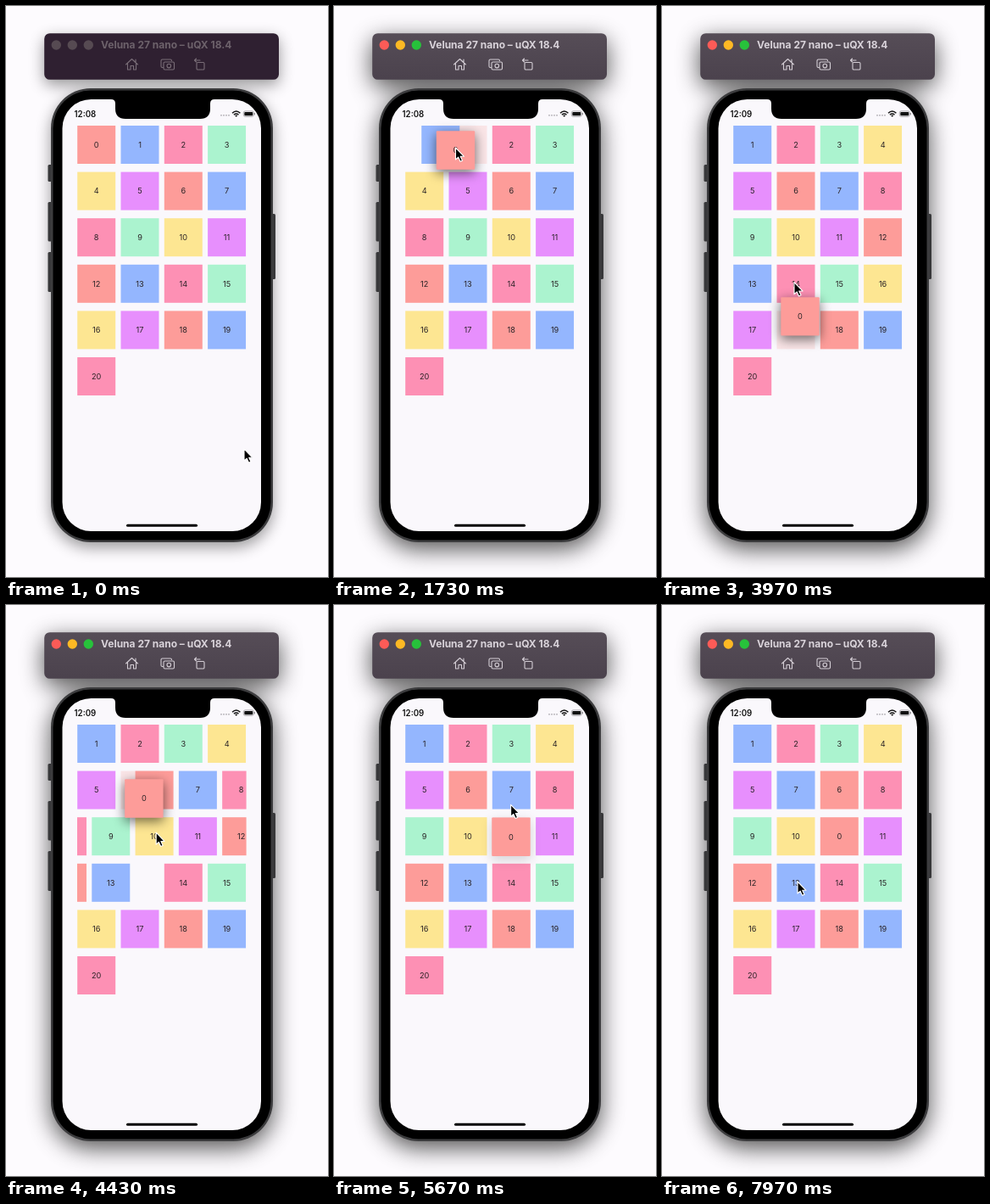
Animation of 380 by 673 pixels, one loop 8000 ms. Source, as an HTML page:

```html
<!DOCTYPE html>
<html lang="en">
<head>
<meta charset="utf-8">
<title>Grid reordering</title>
<style>
  html, body { margin: 0; width: 100%; height: 100%; overflow: hidden; background: #fdfbfe; }
  svg { display: block; width: 380px; height: 673px; }
  text { font-family: Inter, Roboto, sans-serif; }
  .label { font-size: 9.2px; fill: #2a2326; text-anchor: middle; }
  .bar { fill: #2f2031; }
  .ink { fill: #6d626b; }
  .line { fill: none; stroke: #7a6e78; stroke-width: 1.1; stroke-linejoin: round; stroke-linecap: round; }
  .light { fill: #564a52; }
  .active .bar { fill: url(#barFill); }
  .active .ink { fill: #d9d3da; }
  .active .line { stroke: #d4ced5; }
  .active .red { fill: #fc5b57; }
  .active .amber { fill: #fdb924; }
  .active .green { fill: #27c23b; }
  .deep, .active .soft { display: none; }
  .active .deep { display: inline; }
</style>
</head>
<body>
<svg id="stage" viewBox="0 0 380 673">
  <defs>
    <linearGradient id="barFill" x1="0" y1="0" x2="0" y2="1">
      <stop offset="0" stop-color="#564d57"/><stop offset="1" stop-color="#4b424d"/>
    </linearGradient>
    <filter id="blurSoft" x="-30%" y="-30%" width="160%" height="160%"><feGaussianBlur stdDeviation="9"/></filter>
    <filter id="blurDeep" x="-40%" y="-40%" width="180%" height="180%"><feGaussianBlur stdDeviation="14"/></filter>
    <filter id="blurTile" x="-80%" y="-80%" width="260%" height="260%"><feGaussianBlur stdDeviation="7"/></filter>
    <clipPath id="gridClip"><rect x="84" y="136" width="199.6" height="480"/></clipPath>
    <g id="outline">
      <rect x="45" y="32" width="277" height="55" rx="7"/>
      <rect x="53" y="97" width="262" height="535" rx="47"/>
    </g>
  </defs>

  <rect width="380" height="673" fill="#fdfbfe"/>
  <use class="soft" href="#outline" y="6" opacity=".4" filter="url(#blurSoft)"/>
  <use class="deep" href="#outline" y="8" opacity=".68" filter="url(#blurDeep)"/>

  <rect class="bar" x="45.2" y="32.2" width="276.8" height="54.6" rx="6.5"/>
  <circle class="light red" cx="59.3" cy="46" r="5.7"/>
  <circle class="light amber" cx="78.3" cy="46" r="5.7"/>
  <circle class="light green" cx="97.3" cy="46" r="5.7"/>
  <text class="ink" x="112" y="50" font-size="12" font-weight="700">Veluna 27 nano – uQX 18.4</text>
  <g class="line">
    <path d="M141.5 69L148.5 62.5L155.5 69M143.5 68V75H147V70.5H150.5V75H153.5V68M153 66V63"/>
    <path d="M185.5 72.5H184.5Q183 72.5 183 71V64.5Q183 63 184.5 63H194Q195.5 63 195.5 64.5"/>
    <rect x="186" y="66" width="12.5" height="9" rx="1.5"/>
    <circle cx="192.3" cy="70.6" r="2.3"/>
    <rect x="225" y="66.5" width="9" height="8.5" rx="1.3"/>
    <path d="M222.5 64H229M224.5 62L222.5 64L224.5 66"/>
  </g>

  <g fill="#38383a">
    <rect x="49.5" y="187" width="5" height="20" rx="1.5"/>
    <rect x="49.5" y="231" width="5" height="46.5" rx="1.5"/>
    <rect x="49.5" y="290" width="5" height="47" rx="1.5"/>
    <rect x="313" y="245" width="5" height="77" rx="1.5"/>
  </g>
  <rect x="53" y="97" width="262" height="535" rx="47" fill="#3c3c3e"/>
  <rect x="55.5" y="99.5" width="257" height="530" rx="44.5" fill="#000"/>
  <rect x="66.5" y="110" width="234.5" height="509" rx="34" fill="#faf8fc"/>
  <path d="M124 109.5H246V110Q241 110 241 115V121Q241 133 229 133H141Q129 133 129 121V115Q129 110 124 110Z"/>
  <text id="clock" x="80.5" y="130.7" font-size="9.7" font-weight="600" fill="#111"></text>
  <path d="M254 128.8H264" fill="none" stroke="#aaa7ad" stroke-width="1.8" stroke-linecap="round" stroke-dasharray="0 3"/>
  <path d="M267 126.3Q271.7 121.8 276.4 126.3M268.9 128.2Q271.7 125.7 274.5 128.2" fill="none" stroke="#111" stroke-width="1.5"/>
  <path d="M270.2 129.2Q271.7 128 273.2 129.2L271.7 130.8Z" fill="#111"/>
  <rect x="280.3" y="123.9" width="12" height="6.4" rx="2" fill="none" stroke="#8d8a8f" stroke-width=".7"/>
  <rect x="281.3" y="124.9" width="10" height="4.4" rx="1" fill="#111"/>
  <path d="M293.4 126V128.3" stroke="#8d8a8f"/>
  <rect x="142" y="610.8" width="84" height="3" rx="1.5"/>

  <g id="grid" clip-path="url(#gridClip)"></g>
  <g id="drag">
    <rect id="dragShadow" x="-23" y="-19" width="46" height="46" filter="url(#blurTile)"/>
    <rect id="dragTile" x="-22.7" y="-22.7" width="45.4" height="45.4" rx="1"/>
    <text id="dragLabel" class="label" y="3.3"></text>
  </g>
  <path id="cursor" d="M0 0V14L3.2 11.2L5.5 16.3L8 15.2L5.7 10.3H10Z" stroke="#fff" stroke-width="1.1" stroke-linejoin="round"/>
</svg>

<script>
const LOOP = 8000, COLS = 4, COUNT = 21;
const STEP_X = 51.3, STEP_Y = 54.6, SIZE = 45, LEFT = 84.2, TOP = 141;
const SLIDE = 300, DROP = 260, LAG = 90, GHOST = 0.2;
const COLORS = ['#fd9c99', '#94b6fe', '#fd90b4', '#abf3cf', '#fde692', '#e78ffd'];

// Turning points of the pointer: time, x, y
const PATH = [
  [0, 281, 522], [760, 107, 161], [1280, 107, 161], [1540, 143.5, 167], [1730, 143.5, 167],
  [2250, 175, 210], [2680, 158.5, 222], [2770, 153, 232], [3500, 165, 385],
  [3880, 163, 363], [3970, 156, 326], [4300, 160, 218], [4510, 188, 298],
  [4660, 196, 311], [4840, 172, 297], [4930, 161, 284], [5250, 208, 272], [5480, 208, 272],
  [5800, 209, 215], [6220, 209, 215], [6470, 174, 248], [6700, 158, 222],
  [7250, 158, 222], [7850, 160, 326], [LOOP, 160, 326]
];

const GRABS = [
  { id: 0, lift: 1280, drop: 5500 },
  { id: 7, lift: 6220, drop: 6850 }
];

const $ = id => document.getElementById(id);
const clamp = v => Math.max(0, Math.min(1, v));
const ease = v => (v = clamp(v), v * v * (3 - 2 * v));
const mix = (a, b, p) => a + (b - a) * p;
const colX = slot => LEFT + (slot % COLS) * STEP_X;
const rowY = slot => TOP + Math.floor(slot / COLS) * STEP_Y;

function make(tag, attrs, parent) {
  const el = document.createElementNS('http://www.w3.org/2000/svg', tag);
  for (const key in attrs) el.setAttribute(key, attrs[key]);
  return parent.appendChild(el);
}

function makeTile(id) {
  const g = make('g', {}, $('grid'));
  make('rect', { width: SIZE, height: SIZE, fill: COLORS[id % COLORS.length] }, g);
  make('text', { class: 'label', x: SIZE / 2, y: SIZE / 2 + 3.3 }, g).textContent = id;
  return g;
}

function place(el, x, y, opacity = 1) {
  el.setAttribute('transform', `translate(${x.toFixed(2)} ${y.toFixed(2)})`);
  el.setAttribute('opacity', opacity);
}

// Monotone cubic: smooth between turning points, never overshooting them.
function tangent(i, axis) {
  const slope = k => (PATH[k + 1][axis] - PATH[k][axis]) / (PATH[k + 1][0] - PATH[k][0]);
  if (i === 0 || i === PATH.length - 1) return 0;
  const a = slope(i - 1), b = slope(i);
  return a * b <= 0 ? 0 : 2 * a * b / (a + b);
}

function pointer(t) {
  let i = 0;
  while (i < PATH.length - 2 && PATH[i + 1][0] <= t) i++;
  const a = PATH[i], b = PATH[i + 1], span = b[0] - a[0], u = clamp((t - a[0]) / span);
  return [1, 2].map(k => mix(a[k], b[k], ease(u)) +
    span * u * (1 - u) * (tangent(i, k) * (1 - u) - tangent(i + 1, k) * u));
}

function slotAt([x, y]) {
  const col = Math.floor((x - LEFT) / STEP_X), row = Math.floor((y - TOP) / STEP_Y);
  const slot = row * COLS + col;
  const inside = x - colX(slot) <= SIZE && y - rowY(slot) <= SIZE;
  return inside && row >= 0 && col >= 0 && col < COLS && slot < COUNT ? slot : -1;
}

// A held tile takes the slot it hovers over, once the previous slide has ended.
function planMoves() {
  const moves = [];
  for (const { id, lift, drop } of GRABS) {
    let current = slotAt(pointer(lift)), ready = lift;
    for (let t = lift; t < drop; t += 5) {
      const slot = slotAt(pointer(t - LAG));
      if (t < ready || slot < 0 || slot === current) continue;
      moves.push({ time: t, id, slot });
      current = slot;
      ready = t + SLIDE;
    }
  }
  return moves;
}

function layout(t) {
  const order = Array.from({ length: COUNT }, (_, i) => i);
  const state = order.map(i => ({ slot: i, from: i, start: -SLIDE }));
  for (const { time, id, slot } of moves) {
    if (time > t) break;
    order.splice(order.indexOf(id), 1);
    order.splice(slot, 0, id);
    order.forEach((tile, i) => {
      const s = state[tile];
      if (s.slot !== i) Object.assign(s, { from: s.slot, slot: i, start: time });
    });
  }
  return state;
}

function drawTile(id, s, t, held) {
  const [main, twin] = tiles[id];
  const p = held ? 1 : ease((t - s.start) / SLIDE);
  const dir = Math.sign(s.slot - s.from) * STEP_X;
  const wraps = p < 1 && rowY(s.from) !== rowY(s.slot);
  place(main, colX(s.slot) - dir * (1 - p), rowY(s.slot), held ? GHOST : 1);
  place(twin, colX(s.from) + dir * p, rowY(s.from), wraps ? 1 : 0);
}

function drawDrag(grab, state, t) {
  $('drag').style.display = grab ? '' : 'none';
  if (!grab) return;
  const [px, py] = pointer(Math.min(t, grab.drop) - LAG);
  const slot = state[grab.id].slot, home = ease((t - grab.drop) / DROP);
  place($('drag'), mix(px, colX(slot) + SIZE / 2, home), mix(py + 3, rowY(slot) + SIZE / 2, home));
  $('dragShadow').setAttribute('opacity', 0.55 * ease((t - grab.lift) / 200) * (1 - home));
  $('dragTile').setAttribute('fill', COLORS[grab.id % COLORS.length]);
  $('dragLabel').textContent = grab.id;
}

function render(t) {
  $('stage').setAttribute('class', t >= 900 ? 'active' : '');
  $('clock').textContent = t < 2200 ? '12:08' : '12:09';
  const state = layout(t);
  const grab = GRABS.find(g => t >= g.lift && t < g.drop + DROP);
  state.forEach((s, id) => drawTile(id, s, t, grab && grab.id === id));
  drawDrag(grab, state, t);
  place($('cursor'), ...pointer(t));
}

// Each tile has a twin, shown while it wraps from one row to another.
const tiles = Array.from({ length: COUNT }, (_, id) => [makeTile(id), makeTile(id)]);
const moves = planMoves();
const begin = performance.now();
function tick() {
  render((performance.now() - begin) % LOOP);
  requestAnimationFrame(tick);
}
tick();
</script>
</body>
</html>
```
